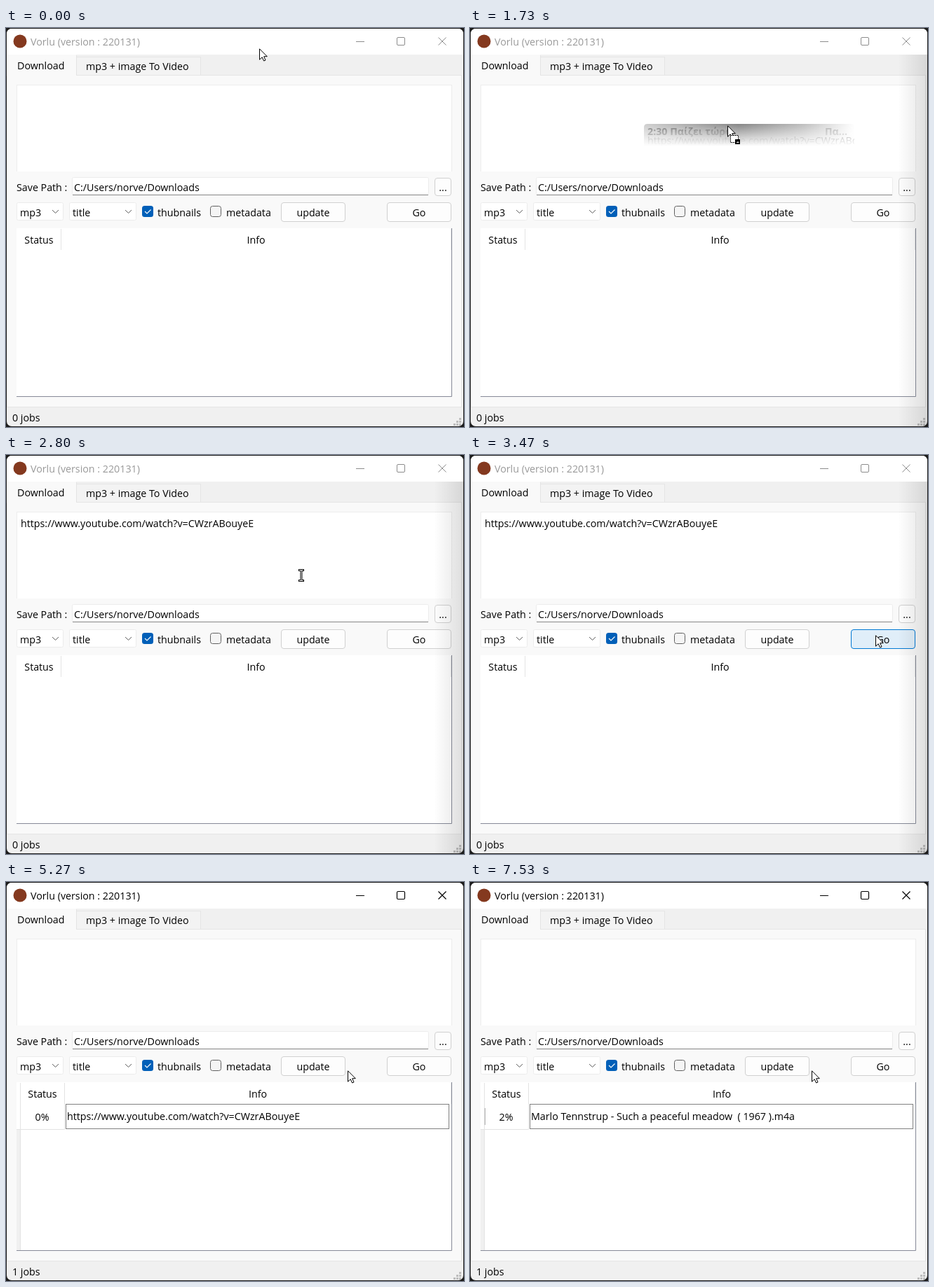
Animation of 653 by 570 pixels, one loop 8 s. Source, as an HTML page:

```html
<!DOCTYPE html>
<html lang="en">
<head>
<meta charset="utf-8">
<title>Downloader window</title>
<style>
html, body { margin: 0; width: 100%; height: 100%; overflow: hidden; background: #1b1b1b; }
svg {
  display: block; width: 653px; height: 570px;
  --active: 0; --shade: 0; --drag: 0; --typed: 0; --row: 0; --job: 0;
  --named: 0; --p0: 1; --p1: 0; --p2: 0; --arrow: 1; --beam: 0;
  animation: state 8s step-end infinite;
}
text { font: 14.25px "Open Sans", "Noto Sans", sans-serif; white-space: pre; }
.mid { text-anchor: middle; }
.field { fill: #fff; stroke: #ececec; }
.button { fill: #fdfdfd; stroke: #d0d0d0; }
.line { fill: none; stroke: #606060; }
.rule { fill: none; stroke: #e3e3e3; }

.idle { opacity: calc(1 - var(--active)); }
.active { opacity: var(--active); }
.empty { opacity: calc(1 - var(--row)); }
.row { opacity: var(--row); }
.link { opacity: calc(1 - var(--named)); }
.named { opacity: var(--named); }
.no-job { opacity: calc(1 - var(--job)); }
.job { opacity: var(--job); }
.typed { opacity: var(--typed); }
.shade { opacity: var(--shade); }
.drag { opacity: var(--drag); }
.arrow { opacity: var(--arrow); }
.beam { opacity: var(--beam); }
.p0 { opacity: var(--p0); }
.p1 { opacity: var(--p1); }
.p2 { opacity: var(--p2); }
#cursor { animation: point 8s step-end infinite; }
#ghost { animation: trail 8s step-end infinite; }
#go { animation: hover 8s step-end infinite; }

@keyframes state {
  1.625% { --arrow: 0; }
  14.125% { --shade: 1; }
  17.5% { --arrow: 1; --drag: 1; }
  26.625% { --arrow: 0; --drag: 0; --beam: 1; --typed: 1; }
  37.5% { --arrow: 1; --beam: 0; }
  38.375% { --arrow: 0; --beam: 1; }
  40.875% { --arrow: 1; --beam: 0; }
  47.5% { --active: 1; --shade: 0; }
  49.125% { --typed: 0; --row: 1; }
  65.875% { --job: 1; }
  80.875% { --named: 1; }
  85.875% { --p0: 0; --p1: 1; }
  94.125% { --p1: 0; --p2: 1; }
}
@keyframes point {
  0% { transform: translate(361px, 29px); }
  .875% { transform: translate(500px, 18px); }
  17.5% { transform: translate(612px, 291px); }
  18.375% { transform: translate(522px, 220px); }
  19.125% { transform: translate(464px, 185px); }
  20% { transform: translate(420px, 163px); }
  20.875% { transform: translate(388px, 148px); }
  21.625% { transform: translate(367px, 139px); }
  22.5% { transform: translate(354px, 128px); }
  23.375% { transform: translate(347px, 120px); }
  24.125% { transform: translate(345px, 117px); }
  30.875% { transform: translate(348px, 121px); }
  31.625% { transform: translate(355px, 129px); }
  32.5% { transform: translate(368px, 141px); }
  33.375% { transform: translate(385px, 153px); }
  34.125% { transform: translate(403px, 163px); }
  35% { transform: translate(421px, 172px); }
  35.875% { transform: translate(443px, 183px); }
  36.625% { transform: translate(467px, 195px); }
  37.5% { transform: translate(492px, 207px); }
  38.375% { transform: translate(517px, 218px); }
  39.125% { transform: translate(538px, 228px); }
  40% { transform: translate(556px, 237px); }
  40.875% { transform: translate(568px, 244px); }
  41.625% { transform: translate(573px, 250px); }
  42.5% { transform: translate(576px, 254px); }
  43.375% { transform: translate(578px, 257px); }
  44.125% { transform: translate(579px, 258px); }
  45% { transform: translate(580px, 259px); }
  55.875% { transform: translate(575px, 260px); }
  56.625% { transform: translate(560px, 263px); }
  57.5% { transform: translate(538px, 266px); }
  58.375% { transform: translate(515px, 268px); }
  59.125% { transform: translate(498px, 269px); }
  60% { transform: translate(490px, 269px); }
  60.875%, 100% { transform: translate(487px, 269px); }
}
@keyframes trail {
  0%, 17.5% { transform: translate(510px, 289px); }
  18.375% { transform: translate(415px, 224px); }
  19.125% { transform: translate(352px, 188px); }
  20% { transform: translate(305px, 164px); }
  20.875% { transform: translate(271px, 148px); }
  21.625% { transform: translate(248px, 137px); }
  22.5% { transform: translate(235px, 126px); }
  23.375% { transform: translate(228px, 118px); }
  24.125%, 100% { transform: translate(226px, 115px); }
}
@keyframes hover {
  0% { fill: #fdfdfd; stroke: #d0d0d0; }
  41.625% { fill: #f5f9fc; stroke: #a6c9e4; }
  42.5% { fill: #ecf4fb; stroke: #62a9de; }
  43.375% { fill: #e0eef9; stroke: #0078d4; }
  47.5% { fill: #d5e7f6; stroke: #2a73b0; }
  48.375% { fill: #cce4f7; stroke: #005499; }
  49.125% { fill: #e8f2fa; stroke: #5fa9dc; }
  50% { fill: #e4f0fa; stroke: #3092d8; }
  50.875% { fill: #e0eef9; stroke: #0078d4; }
  57.5% { fill: #e9f3fa; stroke: #5fa9dc; }
  58.375% { fill: #f4f8fc; stroke: #a6c9e4; }
  59.125%, 100% { fill: #fdfdfd; stroke: #d0d0d0; }
}
</style>
</head>
<body>
<svg viewBox="0 0 653 570">
  <defs>
    <clipPath id="frame"><rect x="1" y="1" width="651" height="568" rx="7"/></clipPath>
    <linearGradient id="edge"><stop stop-opacity="0"/><stop offset="1" stop-opacity=".11"/></linearGradient>
    <linearGradient id="glow">
      <stop stop-color="#222" stop-opacity=".22"/>
      <stop offset=".45" stop-color="#222" stop-opacity=".55"/>
      <stop offset=".75" stop-color="#222" stop-opacity=".3"/>
      <stop offset="1" stop-color="#222" stop-opacity="0"/>
    </linearGradient>
    <linearGradient id="fade" x2="0" y2="1"><stop stop-color="#fff"/><stop offset="1"/></linearGradient>
    <mask id="melt" maskUnits="userSpaceOnUse" x="0" y="0" width="300" height="32">
      <rect width="300" height="32" fill="url(#fade)"/>
    </mask>
    <g id="controls" fill="none">
      <path d="M499 19.5h12M616.500 13.500l11 11m0-11l-11 11"/>
      <rect x="557.500" y="13.500" width="11" height="11" rx="1.500"/>
    </g>
    <path id="chevron" class="line" d="M0 0l4.500 4.500L9 0"/>
  </defs>

  <g clip-path="url(#frame)">
    <rect width="653" height="570" fill="#f0f0f0"/>
    <rect width="653" height="38" fill="#fff"/>
    <circle cx="20" cy="19" r="9.500" fill="#84391f"/>
    <g class="idle">
      <text x="35" y="25" fill="#999">Vorlu (version : 220131)</text>
      <use href="#controls" stroke="#8c8c8c"/>
    </g>
    <g class="active">
      <text x="35" y="25">Vorlu (version : 220131)</text>
      <use href="#controls" stroke="#000" stroke-width="1.200"/>
    </g>

    <!-- Tabs and pane -->
    <rect x="1.500" y="67.500" width="648" height="474" fill="#f9f9f9" stroke="#e5e5e5"/>
    <rect x="100.500" y="41.500" width="177" height="26" fill="#f3f3f3" stroke="#e5e5e5"/>
    <path d="M1 38H100V68.500H1z" fill="#f9f9f9"/>
    <path d="M100.500 39V67" class="rule"/>
    <text x="16" y="59">Download</text>
    <text x="114" y="60">mp3 + image To Video</text>

    <!-- Form -->
    <rect class="field" x="15.500" y="81.500" width="620" height="124"/>
    <path d="M15 205.500H636" stroke="#f9f9f9"/>
    <text class="typed" x="21" y="103">https://www.youtube.com/watch?v=CWzrABouyeE</text>
    <text x="15" y="233">Save Path :</text>
    <rect class="field" x="94.500" y="213.500" width="508" height="25" rx="2"/>
    <path d="M95 238.500H602" stroke="#868686"/>
    <text x="97" y="233">C:/Users/norve/Downloads</text>
    <rect class="button" x="611.500" y="214.500" width="23" height="25" rx="3.500"/>
    <text class="mid" x="623" y="233">...</text>

    <rect class="field" x="15.500" y="249.500" width="66" height="25" rx="2"/>
    <text x="20" y="269">mp3</text>
    <use href="#chevron" x="66" y="260"/>
    <rect class="field" x="90.500" y="249.500" width="95" height="25" rx="2"/>
    <text x="95" y="269">title</text>
    <use href="#chevron" x="170" y="260"/>
    <rect x="194" y="254" width="16" height="16" rx="3.500" fill="#005fb8"/>
    <path d="M198 262l3 3 5.500-5.500" fill="none" stroke="#fff" stroke-width="1.100"/>
    <text x="216" y="269">thubnails</text>
    <rect x="291.500" y="254.500" width="15" height="15" rx="3" fill="#f5f5f5" stroke="#606060"/>
    <text x="314" y="269">metadata</text>
    <rect class="button" x="392.500" y="249.500" width="91" height="27" rx="3.500"/>
    <text class="mid" x="438" y="269">update</text>
    <rect id="go" class="button" x="543.500" y="249.500" width="91" height="27" rx="3.500"/>
    <text class="mid" x="589" y="269">Go</text>

    <!-- Job table -->
    <rect x="15" y="286" width="620" height="240" fill="#fff"/>
    <path d="M634.500 287V317" class="rule"/>
    <path d="M635.500 286V526.500H15" fill="none" stroke="#868a98"/>
    <g class="empty">
      <path d="M78.500 287V317" class="rule"/>
      <text class="mid" x="47" y="308">Status</text>
      <text class="mid" x="356.500" y="308">Info</text>
    </g>
    <g class="row">
      <rect x="15" y="354" width="5" height="172" fill="#f0f0f0"/>
      <path d="M20.500 287V526M83.500 287V353.500H15" class="rule"/>
      <text class="mid" x="52" y="308">Status</text>
      <text class="mid" x="359" y="308">Info</text>
      <rect x="85.500" y="317.500" width="546" height="35" fill="none" stroke="#000" stroke-dasharray="1"/>
      <text class="mid p0" x="51.500" y="341">0%</text>
      <text class="mid p1" x="51.500" y="341">1%</text>
      <text class="mid p2" x="51.500" y="341">2%</text>
      <path class="p2" d="M21.500 323V347" stroke="#b0b0b0"/>
      <text class="link" x="87" y="340">https://www.youtube.com/watch?v=CWzrABouyeE</text>
      <text class="named" x="87" y="340">Marlo Tennstrup - Such a peaceful meadow  ( 1967 ).m4a</text>
    </g>

    <!-- Status bar -->
    <text class="no-job" x="9" y="562">0 jobs</text>
    <text class="job" x="9" y="562">1 jobs</text>
    <path d="M646 557h3v3h-3zM642 561h3v3h-3zm4 0h3v3h-3zM638 565h3v3h-3zm4 0h3v3h-3zm4 0h3v3h-3z" fill="#bdbdbd"/>

    <rect class="shade" x="610" y="38" width="43" height="532" fill="url(#edge)"/>
  </g>

  <g class="drag">
    <g id="ghost">
      <g mask="url(#melt)">
        <path d="M0 32V5Q0 0 5 0H300V32z" fill="url(#glow)"/>
        <g fill="#444" fill-opacity=".6">
          <text x="5" y="16" font-weight="700" style="font-weight:700">2:30 Παίζει τώρα</text>
          <text x="258" y="16" style="font-weight:700" fill-opacity=".3">Πα...</text>
          <text x="5" y="29">https://www.youtube.com/watch?v=CWzrABouyeE</text>
        </g>
      </g>
    </g>
  </g>

  <g id="cursor">
    <path class="arrow" d="M.5 .8V16.200L4.200 12.700 6.600 18 9 17 6.700 11.700H11.300z" fill="#fff" stroke="#000"/>
    <g class="drag">
      <rect x="4.500" y="14.500" width="11" height="10" fill="#fff" stroke="#000" stroke-dasharray="2 1"/>
      <rect x="11" y="20" width="7" height="7"/>
      <path d="M13 24.500h3.500m-1.500-2v3" stroke="#fff" stroke-width=".8"/>
    </g>
    <g class="beam" fill="none">
      <path d="M-4 -7.500H4M-4 7.500H4M0 -8V8" stroke="#000" stroke-width="3"/>
      <path d="M-3 -7.500H3M-3 7.500H3M0 -7V7" stroke="#fff"/>
    </g>
  </g>
</svg>
</body>
</html>
```
